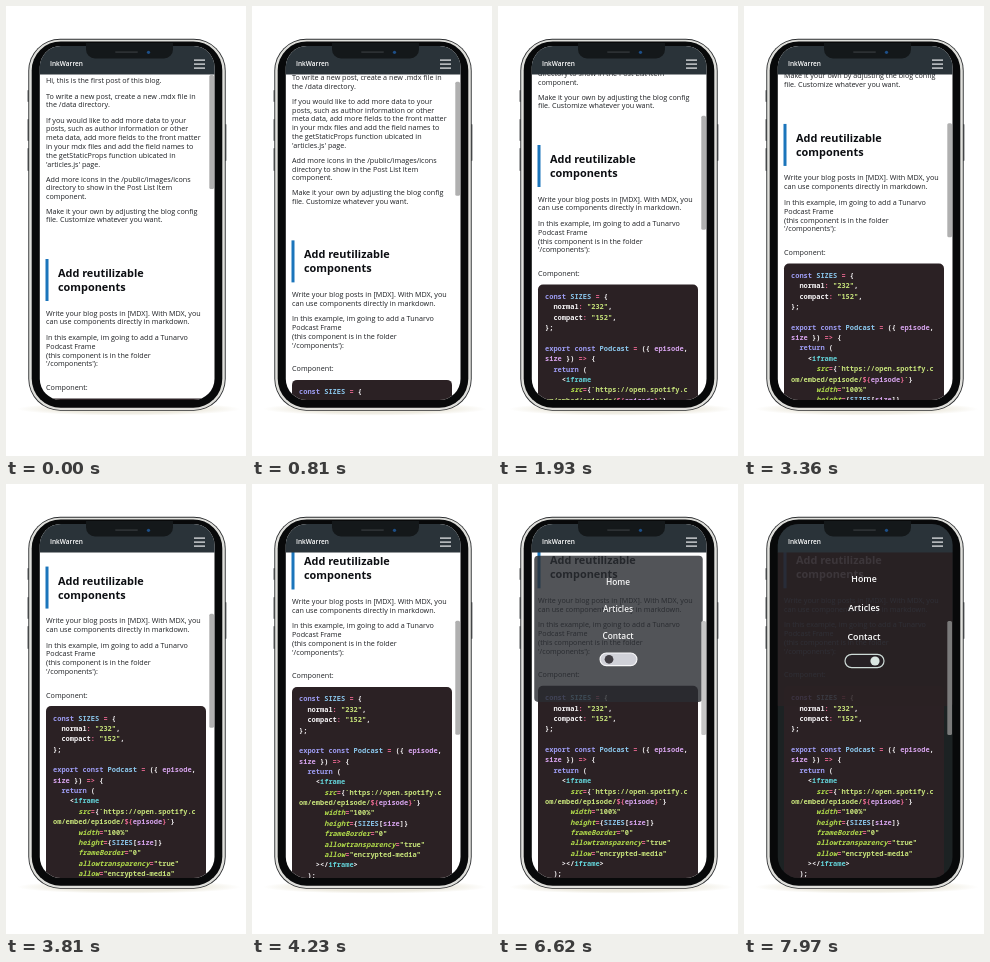
Animation of 240x450 px, one loop 8000 ms. Source, as an HTML page with a canvas:

```html
<!DOCTYPE html>
<html lang="en">
<head>
<meta charset="utf-8">
<title>Blog on a phone</title>
<style>
  html, body { margin: 0; width: 100%; height: 100%; overflow: hidden; background: #fff; }
  canvas { display: block; width: 240px; height: 450px; }
</style>
</head>
<body>
<canvas id="stage"></canvas>
<script>
const canvas = document.getElementById('stage');
const ctx = canvas.getContext('2d');
const ratio = window.devicePixelRatio || 1;
canvas.width = 240 * ratio;
canvas.height = 450 * ratio;

const LOOP = 8000;
const SANS = '"Open Sans", "Noto Sans", sans-serif';
const MONO = '"Noto Sans Mono", "DejaVu Sans Mono", monospace';
const CODE_BG = [43, 33, 36];
const DARK_PAGE = [28, 34, 35];

// Scroll keys: time, offset, velocity
const scrollKeys = [
  [560, 0, 0], [1170, 67, .1], [1930, 114, 0], [3060, 114, 0],
  [3360, 135, .08], [4230, 189.5, .015], [4420, 190.7, 0]
];

// Paragraphs: centre of the first line, then the lines
const paragraphs = [
  [74, 'Hi, this is the first post of this blog.'],
  [90, 'To write a new post, create a new .mdx file in', 'the /data directory.'],
  [114, 'If you would like to add more data to your', 'posts, such as author information or other',
    'meta data, add more fields to the front matter', 'in your mdx files and add the field names to',
    'the getStaticProps function ubicated in', "'articles.js' page."],
  [173, 'Add more icons in the /public/images/icons', 'directory to show in the Post List Item', 'component.'],
  [205, 'Make it your own by adjusting the blog config', 'file. Customize whatever you want.'],
  [307, 'Write your blog posts in [MDX]. With MDX, you', 'can use components directly in markdown.'],
  [331.5, 'In this example, im going to add a Tunarvo', 'Podcast Frame', '(this component is in the folder', "'/components'):"],
  [381.5, 'Component:']
];

// The first letter of each token selects its colour
const tokenColors = {
  k: '#9d9cf2', v: '#8cc8ee', o: '#ee6a94', p: '#f4f2f4',
  s: '#c6e27a', a: '#b2dd4b', t: '#62cfd5', n: '#d5a3ec'
};
const code = [
  ['kconst ', 'vSIZES ', 'o= ', 'p{'],
  ['p  normal', 'o: ', 's"232"', 'p,'],
  ['p  compact', 'o: ', 's"152"', 'p,'],
  ['p};'],
  [],
  ['kexport const ', 'vPodcast ', 'o= ', 'p({ ', 'nepisode', 'p,'],
  ['nsize ', 'p}) ', 'o=> ', 'p{'],
  ['k  return ', 'p('],
  ['p    <', 'tiframe'],
  ['a      src', 'o=', 'p{', 's`https://open.spotify.c'],
  ['som/embed/episode/', 'o${', 'nepisode', 'o}', 's`', 'p}'],
  ['a      width', 'o=', 's"100%"'],
  ['a      height', 'o=', 'p{', 'vSIZES', 'p[', 'nsize', 'p]}'],
  ['a      frameBorder', 'o=', 's"0"'],
  ['a      allowtransparency', 'o=', 's"true"'],
  ['a      allow', 'o=', 's"encrypted-media"'],
  ['p    ></', 'tiframe', 'p>'],
  ['p  );'],
  ['p};']
];

const clamp = x => Math.max(0, Math.min(1, x));
const progress = (t, from, to) => clamp((t - from) / (to - from));
const smooth = x => x * x * (3 - 2 * x);
const mix = (a, b, x) => a.map((v, i) => v + (b[i] - v) * x);
const rgb = (c, alpha = 1) => `rgba(${c.map(Math.round).join()},${alpha})`;

function scrollAt(t) {
  if (t <= scrollKeys[0][0]) return 0;
  const i = scrollKeys.findIndex(key => key[0] > t);
  if (i < 0) return scrollKeys[scrollKeys.length - 1][1];
  const [t0, y0, v0] = scrollKeys[i - 1];
  const [t1, y1, v1] = scrollKeys[i];
  const span = t1 - t0, u = (t - t0) / span, w = 1 - u;
  return y0 * (1 + 2 * u) * w * w + v0 * span * u * w * w
       + y1 * u * u * (3 - 2 * u) - v1 * span * u * u * w;
}

function rounded(x, y, w, h, r) {
  ctx.beginPath();
  ctx.roundRect(x, y, w, h, r);
}

function box(x, y, w, h, r, fill) {
  rounded(x, y, w, h, r);
  ctx.fillStyle = fill;
  ctx.fill();
}

function text(str, x, y, font, fill, align = 'left') {
  ctx.font = font;
  ctx.fillStyle = fill;
  ctx.textAlign = align;
  ctx.fillText(str, x, y);
}

function drawCode() {
  box(40, 392.5, 160, 215, 5, rgb(CODE_BG));
  code.forEach((line, row) => {
    let x = 47;
    for (const token of line) {
      const style = token[0], str = token.slice(1);
      const font = `${style === 'a' ? 'italic ' : ''}600 7px ${MONO}`;
      text(str, x, 407 + row * 10.36, font, tokenColors[style]);
      x += ctx.measureText(str).width;
    }
  });
}

function drawPage(scroll, dark) {
  ctx.fillStyle = rgb(mix([255, 255, 255], DARK_PAGE, dark));
  ctx.fillRect(33, 40, 177, 356);
  const ink = rgb(mix([30, 32, 36], [75, 135, 170], dark));
  const headInk = rgb(mix([12, 14, 18], [170, 185, 200], dark));
  ctx.save();
  ctx.translate(0, -scroll);
  for (const [top, ...lines] of paragraphs) {
    lines.forEach((line, i) => text(line, 40, top + 2.5 + i * 8.8, `500 7.2px ${SANS}`, ink));
  }
  ctx.fillStyle = '#1b75bb';
  ctx.fillRect(39.5, 253, 3, 42);
  text('Add reutilizable', 52, 271, `bold 10.9px ${SANS}`, headInk);
  text('components', 52, 285, `bold 10.9px ${SANS}`, headInk);
  drawCode();
  ctx.restore();
}

function drawMenu(t, dark) {
  if (t < 6310) return;
  const size = 1 - Math.pow(1 - progress(t, 6310, 6770), 2.6);
  if (!size) return;
  ctx.save();
  ctx.globalAlpha = size;
  ctx.translate(120.3, 145);
  ctx.scale(size, size);
  ctx.translate(-120.3, -145);
  box(31.5, 67.5, 178, 154.5, 4, rgb(mix([43, 45, 50], CODE_BG, dark), .86));
  ['Home', 'Articles', 'Contact'].forEach((label, i) =>
    text(label, 120, 98.3 + i * 28.7, `600 8.8px ${SANS}`, '#fff', 'center'));

  const slide = smooth(progress(t, 7370, 7670));
  box(101, 170.3, 39, 13.4, 6.7, rgb(mix([216, 216, 224], [38, 32, 36], slide)));
  ctx.strokeStyle = rgb(mix([252, 252, 253], [205, 218, 214], slide));
  ctx.lineWidth = 1.2;
  ctx.stroke();
  ctx.beginPath();
  ctx.arc(110.5 + 20.5 * slide, 177, 4.6, 0, Math.PI * 2);
  ctx.fillStyle = rgb(mix([58, 54, 60], [218, 230, 225], slide));
  ctx.fill();
  ctx.restore();
}

function drawHeader() {
  ctx.fillStyle = '#2a3339';
  ctx.fillRect(33, 39, 177, 29.5);
  text('InkWarren', 44, 60, `600 6.5px ${SANS}`, '#fff');
  ctx.fillStyle = '#eef0f1';
  for (const y of [53.5, 57.5, 61.5]) ctx.fillRect(188, y, 11, 1.2);
}

function drawShadow() {
  ctx.save();
  ctx.translate(123, 403);
  ctx.scale(1, .06);
  const glow = ctx.createRadialGradient(0, 0, 70, 0, 0, 112);
  glow.addColorStop(0, '#eeebe0');
  glow.addColorStop(1, '#fff');
  ctx.fillStyle = glow;
  ctx.beginPath();
  ctx.arc(0, 0, 112, 0, Math.PI * 2);
  ctx.fill();
  ctx.restore();
}

function drawFrame() {
  for (const [y, h] of [[84, 12], [113, 22], [142, 23]]) box(21.4, y, 1.5, h, .7, '#77787a');
  box(219, 118, 1.5, 37, .7, '#77787a');
  box(22.3, 32.8, 197.4, 372, 32, '#2c2e30');
  box(23.2, 33.7, 195.6, 370.2, 31, '#e0e0dc');
  box(25.7, 35.4, 190.6, 366.4, 29, '#08090a');
}

function drawNotch() {
  box(80, 37, 87, 15.5, [0, 0, 9, 9], '#14181a');
  box(109, 45.3, 23, 1.6, .8, '#2c3033');
  ctx.beginPath();
  ctx.arc(142.5, 46.3, 1.6, 0, Math.PI * 2);
  ctx.fillStyle = '#1d4f88';
  ctx.fill();
}

function render(t) {
  const scroll = scrollAt(t);
  const dark = smooth(progress(t, 7370, 7970));
  ctx.setTransform(ratio, 0, 0, ratio, 0, 0);
  ctx.fillStyle = '#fff';
  ctx.fillRect(0, 0, 240, 450);
  drawShadow();
  drawFrame();
  ctx.save();
  rounded(33.8, 40, 174.7, 354, 21);
  ctx.clip();
  drawPage(scroll, dark);
  drawMenu(t, dark);
  const thumb = t < 5810 ? [176, 176, 176] : mix([198, 198, 198], [122, 122, 122], dark);
  box(203.3, 69 + scroll * .357, 4.7, 114, 1.5, rgb(thumb));
  drawHeader();
  ctx.restore();
  drawNotch();
}

const start = performance.now();
function tick() {
  render((performance.now() - start) % LOOP);
  requestAnimationFrame(tick);
}
tick();
</script>
</body>
</html>
```
